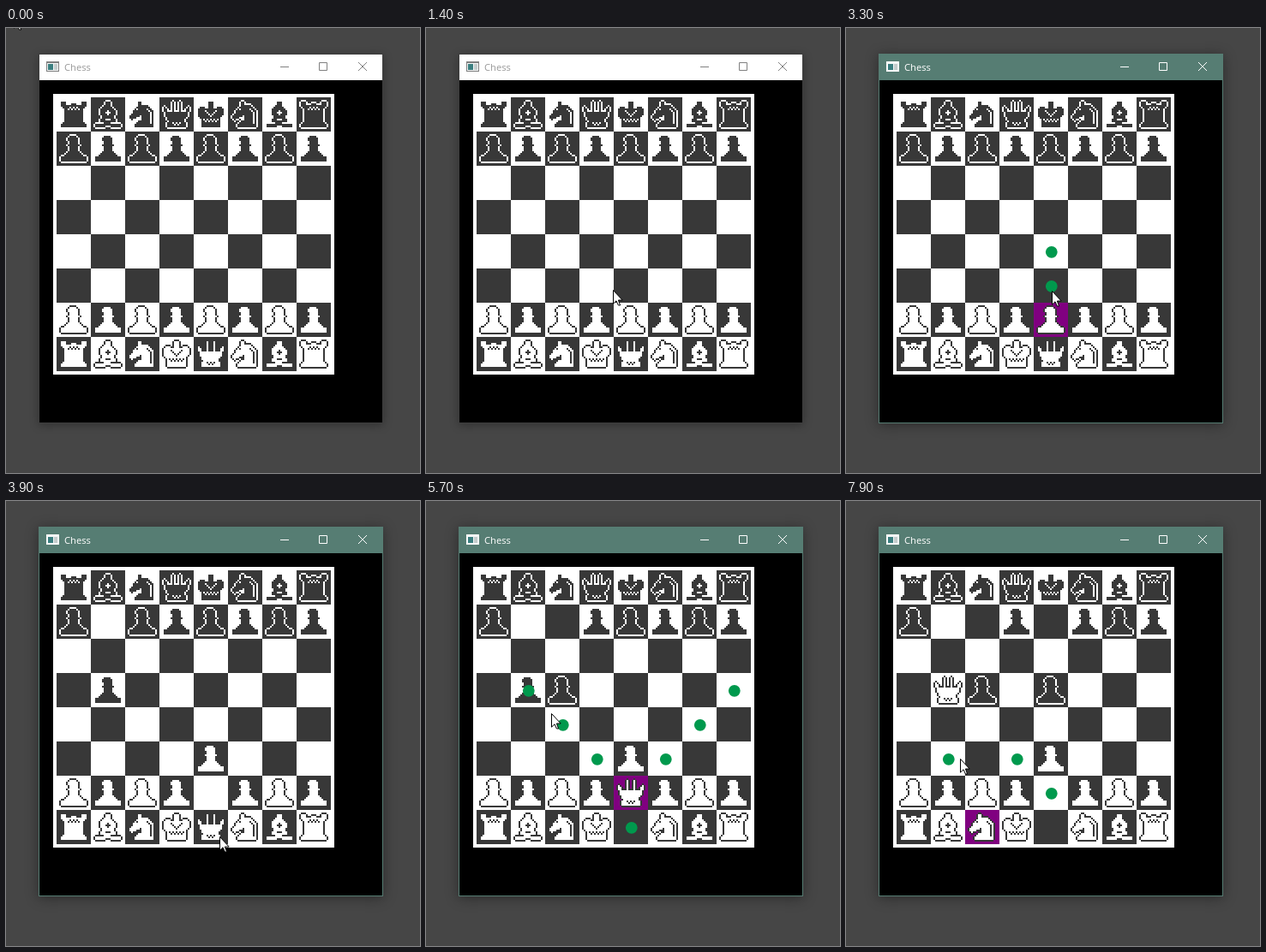
Write an HTML page with a canvas that moves like this. It is 483x520 px and loops after 8000 ms.

```html
<!DOCTYPE html>
<html lang="en">
<head>
<meta charset="utf-8">
<title>Chess</title>
<style>
html, body { margin: 0; width: 100%; height: 100%; overflow: hidden; background: #464646; }
canvas { display: block; }
</style>
</head>
<body>
<canvas id="stage" width="483" height="520"></canvas>
<script>
const ctx = document.getElementById('stage').getContext('2d');
const LOOP = 8000, STEP = 100, CELL = 40, LEFT = 59, TOP = 81;
const DARK = '#383838', LIGHT = '#ffffff', TEAL = '#567d73', ACTIVE_AT = 1600;

// Right-hand outlines 'x,y x,y ...' around x = 0, mirrored unless lopsided.
// mark(x, y) tells which pixels show in the opposite colour.
const wave = (x, y, top, reach) => Math.abs(x) <= reach && y === top + Math.abs(x) % 2;
const SHAPES = {
  P: { path: '1.5,2 3,3.5 3,5 1.9,6 3.6,7 3.6,8 1.9,8 2.5,10 4.6,13 7.5,14.5 7.5,17',
       mark: () => false },
  R: { path: '1.5,3 1.5,4 4.5,4 4.5,2 7.5,2 7.5,5 5.5,6 5.5,14 7.5,15 7.5,17',
       mark: (x, y) => wave(x, y, 5, 3) },
  B: { path: '1.5,2 1.5,4 4.5,7 4.5,9.5 2.6,11 5.5,13 2,14.5 7.5,15 7.5,17 1.5,17 1.5,16',
       mark: (x, y) => Math.abs(x) + Math.abs(y - 8) < 2 || y === 12 && Math.abs(x) < 2 },
  Q: { path: '1.5,8 1.5,2 2.6,2 2.6,8 4.5,8.5 6.5,5 7.5,5 7.5,7 5.5,12 4.5,13 5.5,15 5.5,17',
       mark: (x, y) => wave(x, y, 14, 2) },
  K: { path: '.6,2 1.6,3 1.6,4.5 1,5 2.5,6.5 4,5 6,5 7.5,7 7.5,10 5.5,12 5.5,17',
       mark: (x, y) => wave(x, y, 12, 4) || Math.abs(x) < 4 && y === 10 - Math.abs(x) },
  N: { path: '-2,2 -1,2 0,4 3,4 6,7 7,10 7,17 -5,17 -4,15 0,12 0,10 -3,11 -6,13 -7,12 -7,10 -4,6 -2,4',
       lopsided: true,
       mark: (x, y) => x === -3 && y === 6 || y > 5 && y < 15 && x === Math.min(5, y - 3) }
};

function outline({ path, lopsided }) {
  const points = path.split(' ').map(p => p.split(',').map(Number));
  const all = lopsided ? points : points.concat(points.map(([x, y]) => [-x, y]).reverse());
  const shape = new Path2D();
  all.forEach(([x, y]) => shape.lineTo(x, y));
  shape.closePath();
  return shape;
}

// Double-size pixels: the body in ink, with a one-pixel rim in the edge colour.
function sprite(shape, ink, edge) {
  const c = document.createElement('canvas'), g = c.getContext('2d'), path = outline(shape);
  c.width = c.height = CELL;
  const inside = (x, y) => ctx.isPointInPath(path, x + .01, y + .5);
  for (let y = 0; y < 19; y++) {
    for (let x = -9; x <= 9; x++) {
      const body = inside(x, y);
      const rim = inside(x - 1, y) || inside(x + 1, y) || inside(x, y - 1) || inside(x, y + 1);
      if (!body && !rim) continue;
      g.fillStyle = body && !shape.mark(x, y) ? ink : edge;
      g.fillRect(19 + 2 * x, 1 + 2 * y, 2, 2);
    }
  }
  return c;
}

const sprites = {};
for (const type in SHAPES) {
  sprites[type] = sprite(SHAPES[type], LIGHT, DARK);
  sprites[type.toLowerCase()] = sprite(SHAPES[type], DARK, LIGHT);
}

const START = ['rbnqknbr', 'pppppppp', '', '', '', '', 'PPPPPPPP', 'RBNKQNBR'];
const PLAYS = [
  { pick: 2700, drop: 3400, move: 'e2e3', reply: 'b7b5' },
  { pick: 4000, drop: 4400, move: 'e1e2', reply: 'c7c5' },
  { pick: 4700, drop: 6000, move: 'e2b5', reply: 'e7e5' },
  { pick: 7500, drop: LOOP, move: 'c1b3' }
];

// Pointer glides: start, end, x, y.
const GLIDES = [
  [0, 900, 135, 127], [900, 1900, 245, 365], [2000, 2200, 236, 341], [2700, 3300, 240, 307],
  [3500, 4000, 249, 396], [4000, 4400, 237, 341], [5300, 6000, 126, 227],
  [6800, 6900, 127, 239], [6900, 7500, 152, 375], [7500, 7900, 133, 301]
];

function pointerAt(t) {
  let x = 9, y = -16;
  for (const [start, end, toX, toY] of GLIDES) {
    const p = Math.min(1, Math.max(0, (t - start) / (end - start)));
    const ease = 1 - (1 - p) ** 2;
    x += (toX - x) * ease;
    y += (toY - y) * ease;
  }
  return [Math.round(x), Math.round(y)];
}

const square = name => [name.charCodeAt(0) - 97, 8 - name[1]];

function shift(board, move) {
  const [fx, fy] = square(move), [tx, ty] = square(move.slice(2));
  board[ty][tx] = board[fy][fx];
  board[fy][fx] = ' ';
}

// Squares a light piece can reach.
function reach(board, [x, y]) {
  const piece = board[y][x], found = [];
  const walk = (dx, dy, limit) => {
    for (let i = 1; i <= limit; i++) {
      const c = x + dx * i, r = y + dy * i, there = board[r] && board[r][c];
      if (!there || /[A-Z]/.test(there)) return;
      found.push([c, r]);
      if (there !== ' ') return;
    }
  };
  if (piece === 'P') walk(0, -1, y === 6 ? 2 : 1);
  for (let dx = -2; dx <= 2; dx++) {
    for (let dy = -2; dy <= 2; dy++) {
      if (piece === 'N' && Math.abs(dx * dy) === 2) walk(dx, dy, 1);
      if (piece === 'Q' && Math.max(Math.abs(dx), Math.abs(dy)) === 1) walk(dx, dy, 7);
    }
  }
  return found;
}

function rect(colour, x, y, w, h) {
  ctx.fillStyle = colour;
  ctx.fillRect(x, y, w, h);
}

function drawWindow(active) {
  const ink = active ? '#ffffff' : '#808080';
  rect('#464646', 0, 0, 483, 520);
  ctx.save();
  ctx.shadowColor = active ? 'rgba(0,0,0,.38)' : 'rgba(0,0,0,.3)';
  ctx.shadowBlur = active ? 14 : 10;
  ctx.shadowOffsetY = 2;
  rect(active ? TEAL : '#3e3e3e', 38, 30, 402, 432);
  ctx.restore();
  rect(active ? TEAL : '#ffffff', 39, 31, 400, 30);
  rect('#000000', 39, 61, 400, 400);

  rect(ink, 47, 39, 15, 12);
  rect('#f4f6f6', 48, 41, 13, 9);
  rect('#3b7f80', 49, 42, 6, 7);
  rect('#c4cccc', 56, 42, 4, 7);

  ctx.fillStyle = active ? '#ffffff' : '#999999';
  ctx.font = '11.2px "Open Sans", "Noto Sans", sans-serif';
  ctx.fillText('Chess', 68, 50);

  ctx.strokeStyle = ink;
  ctx.lineWidth = 1;
  ctx.beginPath();
  ctx.moveTo(320, 45.5); ctx.lineTo(330, 45.5);
  ctx.rect(365.5, 40.5, 9, 9);
  ctx.moveTo(411, 40); ctx.lineTo(421, 50);
  ctx.moveTo(421, 40); ctx.lineTo(411, 50);
  ctx.stroke();
}

function drawBoard(t) {
  const board = START.map(row => [...row.padEnd(8)]);
  for (const { drop, move, reply } of PLAYS) {
    if (t < drop) continue;
    shift(board, move);
    shift(board, reply);
  }
  const play = PLAYS.find(p => t >= p.pick && t < p.drop);
  const [px, py] = play ? square(play.move) : [];
  rect(LIGHT, 55, 77, 328, 328);
  for (let r = 0; r < 8; r++) {
    for (let c = 0; c < 8; c++) {
      const x = LEFT + c * CELL, y = TOP + r * CELL, piece = board[r][c];
      const picked = c === px && r === py;
      rect(picked ? '#800080' : (r + c) % 2 ? DARK : LIGHT, x, y, CELL, CELL);
      if (piece !== ' ') ctx.drawImage(sprites[piece], x, y);
    }
  }
  if (!play) return;
  ctx.fillStyle = '#00994d';
  for (const [c, r] of reach(board, [px, py])) {
    ctx.beginPath();
    ctx.arc(LEFT + c * CELL + 20.8, TOP + r * CELL + 20.8, 6.9, 0, 7);
    ctx.fill();
  }
}

const ARROW = new Path2D('M.5 .5V16.2L4 12.8 6.4 18H8.6L6.4 12H11.2Z');

function drawPointer([x, y]) {
  ctx.save();
  ctx.translate(x, y);
  ctx.fillStyle = '#ffffff';
  ctx.strokeStyle = '#000000';
  ctx.fill(ARROW);
  ctx.stroke(ARROW);
  ctx.restore();
}

const begin = performance.now();
let last = -1;

function tick() {
  const t = Math.floor((performance.now() - begin) % LOOP / STEP) * STEP;
  if (t !== last) {
    drawWindow(t >= ACTIVE_AT);
    drawBoard(t);
    drawPointer(pointerAt(t));
    last = t;
  }
  requestAnimationFrame(tick);
}
tick();
</script>
</body>
</html>
```
